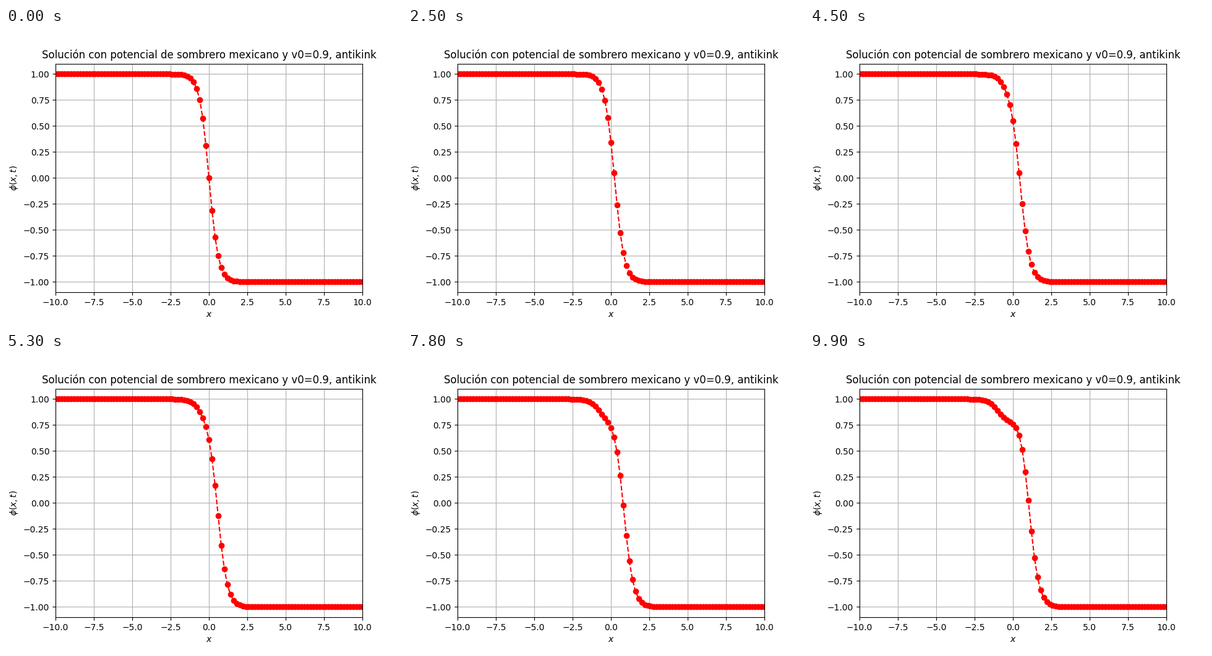
These frames come from a looping animation (640 px wide and 480 px high, 10 s). A matplotlib script:

```python
import matplotlib.pyplot as plt
import numpy as np
from matplotlib.animation import FuncAnimation

V0 = 0.9
DX, DT = 0.2, 0.01
FRAMES = 100


def force(phi):
    return phi**3 - phi


def evolve():
    """Leapfrog solution of the field equation with a boosted antikink start."""
    x = np.linspace(-10, 10, round(20 / DX) + 1)
    k = 1 / np.sqrt(2 * (1 - V0**2))
    phi = np.empty((FRAMES, x.size))
    phi[0] = -np.tanh(k * x)
    phi[1] = phi[0] + DT * V0 * k / np.cosh(k * x)**2
    phi[:, 0], phi[:, -1] = phi[0, 0], phi[0, -1]
    for n in range(1, FRAMES - 1):
        now = phi[n]
        lap = (now[2:] - 2 * now[1:-1] + now[:-2]) / DX**2
        phi[n + 1, 1:-1] = (2 * now[1:-1] - phi[n - 1, 1:-1]
                            + DT**2 * (lap + force(now[1:-1])))
    return x, phi


x, phi = evolve()

fig, ax = plt.subplots(figsize=(6.4, 4.8), dpi=100)
line, = ax.plot(x, phi[0], "ro--")
ax.set_xlim(-10, 10)
ax.set_ylim(-1.1, 1.1)
ax.set_title("Solución con potencial de sombrero mexicano y v0=0.9, antikink")
ax.set_xlabel("$x$")
ax.set_ylabel(r"$\phi(x,t)$")
ax.grid(True)


def update(n):
    line.set_ydata(phi[n])
    return line,


anim = FuncAnimation(fig, update, frames=FRAMES, interval=100,
                     repeat=True, repeat_delay=0)
plt.show()
```
